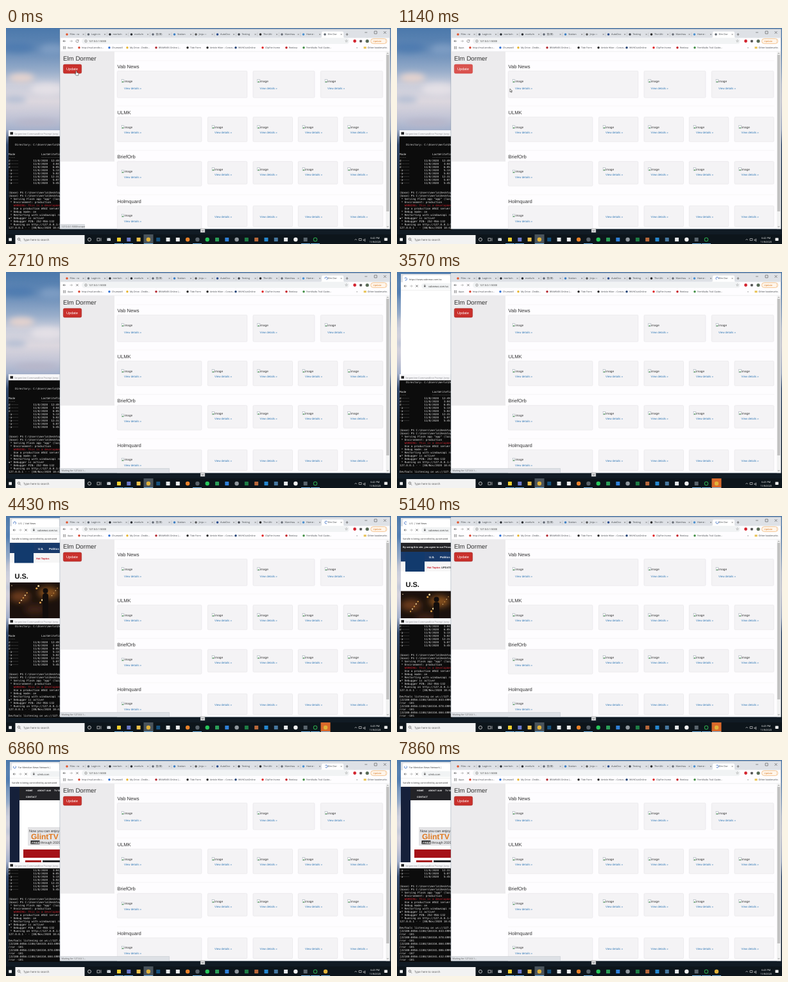
An HTML page that plays this animation: 600 px wide and 338 px high, repeating every 8 s.

```html
<!DOCTYPE html>
<html lang="en">
<head>
<meta charset="utf-8">
<title>Desktop recording</title>
<style>
html, body { margin: 0; width: 100%; height: 100%; overflow: hidden; background: #0c131b; }
svg { display: block; width: 100vw; height: 100vh; }
text { white-space: pre; text-rendering: geometricPrecision; }
.ui { font-family: "Open Sans", "Noto Sans CJK SC", sans-serif; }
.page { font-family: "Liberation Sans", Arial, sans-serif; }
.mono { font-family: "DejaVu Sans Mono", monospace; }
</style>
</head>
<body>
<script>
const NS = "http://www.w3.org/2000/svg";
const LOOP = 8000;

function el(parent, tag, attrs = {}, text) {
  const node = document.createElementNS(NS, tag);
  for (const key in attrs) node.setAttribute(key, attrs[key]);
  if (text !== undefined) node.textContent = text;
  parent.appendChild(node);
  return node;
}
const group = (p, attrs) => el(p, "g", attrs);
const rect = (p, x, y, width, height, fill, more) => el(p, "rect", { x, y, width, height, fill, ...more });
const dot = (p, cx, cy, r, fill, more) => el(p, "circle", { cx, cy, r, fill, ...more });
const line = (p, d, stroke, width = 0.6) => el(p, "path", { d, stroke, fill: "none", "stroke-width": width });
const label = (p, x, y, text, size, fill, font = "ui", more) =>
  el(p, "text", { x, y, "font-size": size, fill, class: font, ...more }, text);
const show = (node, on) => node.setAttribute("visibility", on ? "inherit" : "hidden");
const patches = (p, list) =>
  list.forEach(([cx, cy, rx, ry, fill]) => el(p, "ellipse", { cx, cy, rx, ry, fill }));

function gradient(id, x2, y2, stops) {
  const g = el(defs, "linearGradient", { id, x1: 0, y1: 0, x2, y2 });
  stops.forEach(([offset, color]) => el(g, "stop", { offset, "stop-color": color }));
}
function clip(id, x, y, w, h) {
  rect(el(defs, "clipPath", { id }), x, y, w, h, "#000");
  return { "clip-path": `url(#${id})` };
}

const svg = el(document.body, "svg", { viewBox: "0 0 600 338", preserveAspectRatio: "none" });
const defs = el(svg, "defs");
const blur = el(defs, "filter", { id: "soft", x: "-50%", y: "-50%", width: "200%", height: "200%" });
el(blur, "feGaussianBlur", { stdDeviation: 5 });

function spinner(p, x, y) {
  const outer = group(p, { transform: `translate(${x} ${y})` });
  return line(outer, "M0 -2A2 2 0 1 1 -2 0", "#3c6fc4", 0.8);
}
function navIcons(p, x, y, step) {
  line(p, `M${x + 2} ${y}h-4m1.8 -1.8l-1.8 1.8l1.8 1.8`, "#555", 0.7);
  line(p, `M${x + step - 2} ${y}h4m-1.8 -1.8l1.8 1.8l-1.8 1.8`, "#aaa", 0.7);
}
const stopIcon = (p, x, y) => line(p, `M${x - 1.7} ${y - 1.7}l3.4 3.4m0 -3.4l-3.4 3.4`, "#555", 0.7);

// Desktop
gradient("sky", 0, 1, [[0, "#4b78ab"], [0.1, "#6389b6"], [0.2, "#98adca"], [0.26, "#c9cddb"],
  [0.34, "#dcd7de"], [0.41, "#c3c5d6"], [0.47, "#a5b1cb"], [0.54, "#33496b"], [0.7, "#1b2b3f"],
  [0.9, "#111b25"], [1, "#0c131b"]]);
rect(svg, 0, 0, 600, 338, "url(#sky)");
const clouds = group(group(svg, clip("cloudClip", 0, 0, 84, 161)), { filter: "url(#soft)" });
patches(clouds, [[18, 30, 26, 8, "#4f7cb0"], [72, 34, 20, 9, "#7c9bc2"], [24, 78, 20, 7, "#e6d3cd"],
  [64, 96, 26, 9, "#e4e0e6"], [14, 112, 18, 6, "#b5bfd4"], [48, 148, 34, 5, "#b7b5c8"]]);
rect(svg, 0, 315, 600, 8, "#111b24");

// Rear browser window
const rear = group(svg, clip("rearClip", 6, 3, 80, 160));
rect(rear, 6, 3, 80, 160, "#fff");
rect(rear, 6, 3, 80, 13, "#dee1e6");
rect(rear, 9, 5, 74, 12, "#fff", { rx: 2 });
const rearSpin = spinner(rear, 13.5, 11);
const rearTitle = label(rear, 19, 12.5, "", 3.7, "#333");
navIcons(rear, 13, 22, 9);
stopIcon(rear, 31, 22);
rect(rear, 38, 17.5, 60, 9, "#f1f3f4", { rx: 4.5 });
rect(rear, 42, 21.2, 2.6, 2.2, "#666");
line(rear, "M42.5 21v-.7a.8 .8 0 0 1 1.6 0v.7", "#666", 0.4);
const rearUrl = label(rear, 49, 23.6, "", 4, "#333");
line(rear, "M6 28.5h80", "#ddd", 0.5);
const infoBar = group(rear);
label(infoBar, 9, 36.8, "Vandle is being controlled by automated", 3.75, "#333");
line(infoBar, "M6 41.5h80", "#ccc", 0.5);

const newsSite = group(rear, clip("siteClip", 6, 42, 80, 121));
const newsBody = group(newsSite);
rect(newsBody, 6, 42, 80, 121, "#fff");
rect(newsBody, 6, 42, 80, 16, "#183a6b");
rect(newsBody, 6, 58, 80, 15, "#f6f6f6");
rect(newsBody, 13, 43.5, 30, 30, "#123a6d");
label(newsBody, 50, 52.7, "U.S.", 4.4, "#fff", "page", { "font-weight": 700 });
label(newsBody, 67, 52.7, "Politics", 4.4, "#fff", "page", { "font-weight": 700 });
label(newsBody, 47, 68, "Hot Topics", 4, "#c4121f", "page", { "font-weight": 700 });
const updateTag = label(newsBody, 69, 68, "UPDATES", 4, "#333", "page", { "font-weight": 700 });
label(newsBody, 13.5, 97.5, "U.S.", 11, "#111", "page", { "font-weight": 700 });
rect(newsBody, 6, 104, 80, 60, "#1b110d");
const photo = group(newsBody, { filter: "url(#soft)" });
patches(photo, [[22, 126, 16, 9, "#6b3a1a"], [66, 120, 16, 9, "#85501f"], [45, 146, 16, 8, "#3d2216"]]);
for (let i = 0; i < 14; i++)
  dot(newsBody, 9 + (i * 23.7) % 74, 109 + (i * 11.3) % 30, 0.7 + i % 3 * 0.4, i % 2 ? "#e0a24a" : "#f3d9a0");
rect(newsBody, 57, 121, 9, 40, "#120d0c", { rx: 4 });
dot(newsBody, 61.5, 117, 4, "#120d0c");
const consent = group(newsSite);
rect(consent, 6, 42, 80, 14, "#242428");
label(consent, 9, 50.2, "By using this site, you agree to our Privacy", 3.8, "#fff", "page", { "font-weight": 700 });

const tvSite = group(rear);
rect(tvSite, 6, 42, 80, 121, "#15203a");
rect(tvSite, 21, 42, 65, 121, "#fff");
rect(tvSite, 21, 42, 65, 21, "#232327");
[[31, 48.5, "HOME"], [49, 48.5, "ABOUT ULM"], [75, 48.5, "TV SERIES"], [31, 58.5, "CONTACT"]]
  .forEach(([x, y, s]) => label(tvSite, x, y, s, 3.5, "#fff", "page", { "font-weight": 700 }));
rect(tvSite, 34, 105, 52, 29, "#e4e4e6");
label(tvSite, 36, 112.5, "Now you can enjoy", 5.6, "#333", "page");
label(tvSite, 39, 124, "GlintTV", 12, "#e07a22", "page", { "font-weight": 700 });
rect(tvSite, 38.5, 126, 14, 5.6, "#222");
label(tvSite, 40, 130.5, "FREE", 4.8, "#fff", "page", { "font-weight": 700, "font-style": "italic" });
label(tvSite, 54, 130.5, "through 2020", 5.2, "#333", "page");
rect(tvSite, 27, 140, 59, 13, "#a51218");
rect(tvSite, 30, 157, 25, 6, "#a51218");
rect(tvSite, 57, 157, 29, 6, "#232327");

// Terminal
const term = group(svg, clip("termClip", 4, 160, 82, 156));
rect(term, 4, 160, 82, 156, "#0c0c0c");
rect(term, 4, 160, 82, 9.5, "#f6f6f8");
rect(term, 6.5, 162.8, 4.5, 4, "#222");
label(term, 13, 166.5, "Serpentine Commandline Prompt (serp", 3.75, "#85858a");
const file = (mode, time) => mode.padEnd(15) + "11/8/2020  " + time.padStart(5);
const path = "C:\\Users\\merlo\\Desktop";
const fault = (stamp, code) => [`[22180:8056:1108/${stamp}:ERROR`, `rror -${code}`];
const output = [
  "    Directory: " + path, "", "",
  "Mode                LastWriteTime", "----                -------------",
  file("d-----", "12:49"), file("d-----", "3:04"), file("d-----", "6:05"), file("-a----", "5:13"),
  file("-a----", "5:02"), file("-a----", "12:31"), file("-a----", "5:07"), file("-a----", "5:45"),
  "", "", "(base) PS " + path, "(base) PS " + path,
  " * Serving Flask app \"app\" (lazy", " * Environment: production",
  "   WARNING: This is a development", "   Use a production WSGI server",
  " * Debug mode: on", " * Restarting with windowsapi re", "▪* Debugger is active!",
  " * Debugger PIN: 252-956-132", " * Running on http://127.0.0.1:5", "127.0.0.1 - - [08/Nov/2020 18:42",
  "", "DevTools listening on ws://127.0.",
  ...fault("184333.843", 101), ...fault("184334.078", 101), ...fault("184334.084", 101),
  ...fault("184341.086", 107), ...fault("184341.432", 101)
];
const termText = group(group(term, clip("bodyClip", 4, 170, 82, 146)));
const rows = output.map((s, i) =>
  label(termText, 4.1, i * 5 + 1.2, s, 4.24, s.includes("WARNING") ? "#c5202c" : "#e2e2e2", "mono"));

// Main browser window
const main = group(svg);
rect(main, 84, 1.5, 514.5, 313, "#fefdff", { stroke: "#75828f", "stroke-width": 0.5 });
rect(main, 84.3, 2, 514, 13.5, "#dee1e6");
el(main, "path", { d: "M490 15.5q2 0 2 -2v-6q0 -2 2 -2h30q2 0 2 2v6q0 2 2 2z", fill: "#fff" });
const tabs = ["Files - ra", "Login in", "merlo/n", "merlo/n", "登(录)", "Station", "Jinja —",
  "AutoDoc", "Testing", "The Ulti", "Marshou", "Home -", "Elm Dor"];
const tabColors = ["#e2552c", "#5f6670", "#24292e", "#24292e", "#5f6670", "#3b7fc4", "#555",
  "#2b4c8c", "#3b4047", "#222", "#666c74", "#4a90d0", "#5f6670"];
let pageIcon;
tabs.forEach((name, i) => {
  const x = 95 + i * 33.5;
  pageIcon = dot(main, x, 10, 1.8, tabColors[i]);
  label(main, x + 4.5, 11.4, name, 3.8, "#3c4043");
  line(main, `M${x + 24.5} 8.9l2.2 2.2m0 -2.2l-2.2 2.2`, "#555", 0.45);
  if (i < 11) line(main, `M${x + 29} 7v6`, "#aaa", 0.4);
});
const pageSpin = spinner(main, 499, 10);
line(main, "M529.5 10h4m-2 -2v4", "#444");
line(main, "M559 7h4M574 5h4v4h-4zM588.5 5l4 4m0 -4l-4 4", "#333", 0.5);

navIcons(main, 91, 20.5, 10.5);
const reload = line(main, "M113 20.5a2 2 0 1 1 -.7 -1.5m.8 -1v1.6h-1.6", "#555", 0.6);
const halt = group(main);
stopIcon(halt, 111, 20.5);
rect(main, 118, 16, 417, 9, "#f1f3f4", { rx: 4.5 });
dot(main, 124.5, 20.5, 1.9, "none", { stroke: "#666", "stroke-width": 0.5 });
line(main, "M124.5 20v1.6m0 -2.6v.5", "#666", 0.5);
label(main, 129, 22, "127.0.0.1:5000", 4, "#333");
label(main, 528, 22.3, "☆", 5, "#555");
dot(main, 543.5, 20.5, 2.4, "#d3232e");
rect(main, 551, 18.8, 3.8, 3.6, "#555", { rx: 0.8 });
dot(main, 563, 20.5, 2.6, "#576a55");
rect(main, 568.5, 16.7, 25, 7.7, "#fff6ec", { rx: 3.8, stroke: "#eda24f", "stroke-width": 0.6 });
label(main, 572, 22, "Update", 3.8, "#d9771c");
label(main, 589.5, 22.2, "⋮", 4.5, "#d9771c");

for (let i = 0; i < 9; i++) rect(main, 89 + i % 3 * 1.5, 28.8 + (i / 3 | 0) * 1.5, 1, 1, "#777");
const marks = [[96, "Apps"], [118, "http://mail.zindle.c...", "#d8432f"],
  [165, "Chumwell", "#2d6fd2"], [193, "My Drive - Zindle...", "#e7b52c"], [238, "BRAWNEX Online (...", "#b3262e"],
  [287, "Tide Form", "#222"], [318, "Amble Hiker – Convo...", "#222"], [362, "WVHClubOnline", "#1c3f73"],
  [404, "ClipFen home", "#e02020"], [441, "Reelova", "#c3141c"], [468, "FernWalks Trail Guide...", "#3e8e41"]];
marks.forEach(([x, s, c]) => {
  if (c) dot(main, x - 4, 30.8, 1.7, c);
  label(main, x, 32.2, s, 3.6, "#3c4043");
});
label(main, 546, 32.2, "»", 4, "#555");
rect(main, 557.5, 29.3, 4, 3, "#e8c14e");
label(main, 563.5, 32.2, "Other bookmarks", 3.7, "#3c4043");
line(main, "M84.3 36.8h514", "#e0e1e4", 0.6);

// Page
const page = group(main, clip("pageClip", 84.3, 37, 514, 277.2));
rect(page, 85, 37, 84, 172, "#ecebed");
label(page, 89, 51.3, "Elm Dormer", 9.7, "#333", "page");
const button = rect(page, 89.3, 57, 28.4, 14, "#c9302c", { rx: 2, "stroke-width": 0.6 });
label(page, 94, 66, "Update", 5.6, "#fff", "page");

function card(x, y, w, h, imageY, linkY) {
  rect(page, x, y, w, h, "#f4f3f5", { rx: 1.5, stroke: "#e4e3e6", "stroke-width": 0.6 });
  if (imageY) {
    rect(page, x + 6.8, imageY - 2.3, 3.4, 4.4, "#fff", { stroke: "#9aa5b1", "stroke-width": 0.5 });
    el(page, "path", { d: `M${x + 7} ${imageY + 2}l1.6 -2l1.6 2z`, fill: "#4f9a54" });
    label(page, x + 11, imageY + 1.7, "image", 4.7, "#333", "page");
  }
  label(page, x + 10.6, linkY + 1.5, "View details »", 4.4, "#337ab7", "page");
}
const slots = [[314.3, 61.5], [385, 61.5], [455.3, 61.5], [526, 61.3]];
const sections = [
  ["Vab News", 51, 62.7, 67.3, [173.4, 202.4, 41.8, 83, 94.5], [[385, 96], [490.3, 96.7]], [41.8, 83, 94.5]],
  ["ULMK", 122, 134.8, 139.3, [173.4, 131.5, 38.7, 155, 163.6], slots, [38.7, 155, 163.6]],
  ["BriefOrb", 191.5, 204.3, 208.7, [173.4, 131.5, 38.6, 224.5, 233], slots, [35.5, 221, 229.6]],
  ["Holmquard", 261, 273.7, 278.2, [173.4, 131.5, 40, 293.5, 302], slots, [32.5, 0, 295.8]]
];
sections.forEach(([title, ruleY, titleY, y, [x, w, h, imageY, linkY], rest, [h2, image2, link2]]) => {
  line(page, `M173 ${ruleY}H588`, "#f1f0f2", 0.6);
  label(page, 173.4, titleY, title, 7.65, "#333", "page");
  card(x, y, w, h, imageY, linkY);
  rest.forEach(([rx, rw]) => card(rx, y, rw, h2, image2, link2));
});
rect(page, 592, 37, 6, 278, "#f1f1f1");
rect(page, 592.7, 42, 4.4, 245, "#c1c1c1");
line(page, "M593.6 40.5l1.3 -1.5l1.3 1.5M593.6 310l1.3 1.5l1.3 -1.5", "#666", 0.6);

const status = rect(page, 84.3, 307.2, 40, 7.3, "#dee1e6", { stroke: "#bfc3c8", "stroke-width": 0.5 });
const statusText = label(page, 86.5, 312.2, "", 3.6, "#555");

// Taskbar
rect(svg, 303, 314, 7, 6, "#d8dadc", { stroke: "#777", "stroke-width": 0.4 });
line(svg, "M305 316.4l1.5 1.6l1.5 -1.6", "#333", 0.7);
rect(svg, 0, 323, 600, 15, "#0d151b");
rect(svg, 4.4, 328.7, 4.6, 4.6, "#f3f5f7");
rect(svg, 14.5, 324, 108, 14, "#f2f2f2");
dot(svg, 20, 330.4, 1.7, "none", { stroke: "#333", "stroke-width": 0.6 });
line(svg, "M21.2 331.7l1.8 1.9", "#333", 0.6);
label(svg, 27, 332.8, "Type here to search", 4.45, "#555");
dot(svg, 130, 331, 2.5, "none", { stroke: "#fff", "stroke-width": 0.7 });
rect(svg, 142, 329, 4, 4, "none", { stroke: "#ddd", "stroke-width": 0.7 });
line(svg, "M148 328.5v5", "#ddd", 0.7);
rect(svg, 157.5, 328.7, 5.6, 4.4, "#e8ecef");
line(svg, "M157.5 329l2.8 2.4l2.8 -2.4", "#456", 0.5);
rect(svg, 214.5, 323, 15, 15, "#4a545c");
const apps = "#f4d02e #6a78c9 #f0c14b o#e0b23a #16517c #e4e8e8 #eef0f0 o#e8812a o#59636b o#27c65a #2a9d57 #2f80d8 o#8f979d #1e7d45 #b9683a #2587cf #47789f #e6e9eb o#f1f1f1 #59646c o#2ca84e";
apps.split(" ").forEach((spec, i) => {
  const x = 176 + i * 15.3, round = spec[0] === "o", color = spec.replace("o", "");
  if (round) dot(svg, x, 331, 3.2, color);
  else rect(svg, x - 3, 328, 6, 6, color, { rx: 0.4 });
});
dot(svg, 482, 331, 2.2, "#0d151b");
[169, 184, 215, 291, 460, 475].forEach(x => rect(svg, x, 337, 14, 1, "#76b9ed"));
const newApp = group(svg);
const alertBox = rect(newApp, 490.5, 323, 15, 15, "#d9692b");
dot(newApp, 498, 331, 3.2, "#e0b23a");
rect(newApp, 491, 337, 14, 1, "#76b9ed");
line(svg, "M543.4 332l1.7 -1.8l1.7 1.8M550 329.5h4v3h-4zM557 332.6v-1.5h1.3l1.4 -1.2v4l-1.4 -1.3z", "#e5e5e5", 0.6);
const clock = label(svg, 575, 330, "", 3.8, "#fff", "ui", { "text-anchor": "middle" });
label(svg, 575, 336, "11/8/2020", 3.8, "#fff", "ui", { "text-anchor": "middle" });
rect(svg, 589.5, 328.5, 5, 4.4, "#f0f0f0", { rx: 0.4 });

// Pointers
const arrow = el(svg, "path", { d: "M0 0v5.2l1.3 -1.2l.8 1.9l1 -.4l-.9 -1.8h1.6z", fill: "#fff", stroke: "#111", "stroke-width": 0.5 });
const hand = el(svg, "path", { d: "M-.7 -2.6q.7 -.9 1.4 0v2.3l2.2 .6q.9 .4 .7 1.5l-.5 2.4h-3.3l-2.2 -2.7q.1 -.9 1.1 -.3l.6 .5z",
  fill: "#fff", stroke: "#111", "stroke-width": 0.5 });

const ease = u => u * u * (3 - 2 * u);
const ramp = (t, a, b) => ease(Math.min(1, Math.max(0, (t - a) / (b - a))));

function draw(t) {
  const away = ramp(t, 570, 1050) - ramp(t, 1290, 1600);
  const x = 109.5 + 66.5 * away, y = 70 + 25 * away;
  const hover = x < 118 && y < 73;
  const loading = t >= 1710;
  const pointer = t < 2000;
  for (const node of [arrow, hand]) node.setAttribute("transform", `translate(${x} ${y})`);
  show(hand, pointer && hover);
  show(arrow, pointer && !hover);

  button.setAttribute("fill", hover || loading ? "#c9302c" : "#d9534f");
  button.setAttribute("stroke", loading ? "#a02320" : hover ? "#ac2925" : "#d43f3a");
  show(status, hover || loading);
  status.setAttribute("width", loading ? 170 : 38);
  statusText.textContent = loading ? "Waiting for 127.0.0.1..." : hover ? "127.0.0.1:5000/scrape" : "";

  show(pageIcon, !loading);
  show(pageSpin, loading);
  show(reload, !loading);
  show(halt, loading);
  pageSpin.setAttribute("transform", `rotate(${t * 0.36})`);
  rearSpin.setAttribute("transform", `rotate(${t * 0.36 + 90})`);

  const opened = t >= 3000, news = t >= 4140, agreed = t >= 5000, second = t >= 6430, tv = t >= 6860;
  clock.textContent = opened ? "6:43 PM" : "6:42 PM";
  show(rear, opened);
  show(newApp, opened);
  show(alertBox, opened && !second);
  show(infoBar, news);
  show(newsSite, news && !tv);
  show(consent, news && agreed && !tv);
  show(updateTag, news && agreed && !tv);
  show(tvSite, tv);
  newsBody.setAttribute("transform", `translate(0 ${agreed ? 13.5 : 0})`);
  rearTitle.textContent = tv ? "Far Meridian News Network |" : second ? "https://www.ulmk.com"
    : news ? "U.S. | Vab News" : "https://www.vabnews.com/us";
  rearUrl.textContent = second ? "ulmk.com" : "vabnews.com/us";

  const count = t >= 7000 ? 39 : agreed ? 35 : t >= 4860 ? 31 : opened ? 29 : 27;
  termText.setAttribute("transform", `translate(0 ${313 - (count - 1) * 5})`);
  rows.forEach((row, i) => show(row, i < count));
}

const start = performance.now();
function tick() {
  draw((performance.now() - start) % LOOP);
  requestAnimationFrame(tick);
}
tick();
</script>
</body>
</html>
```
